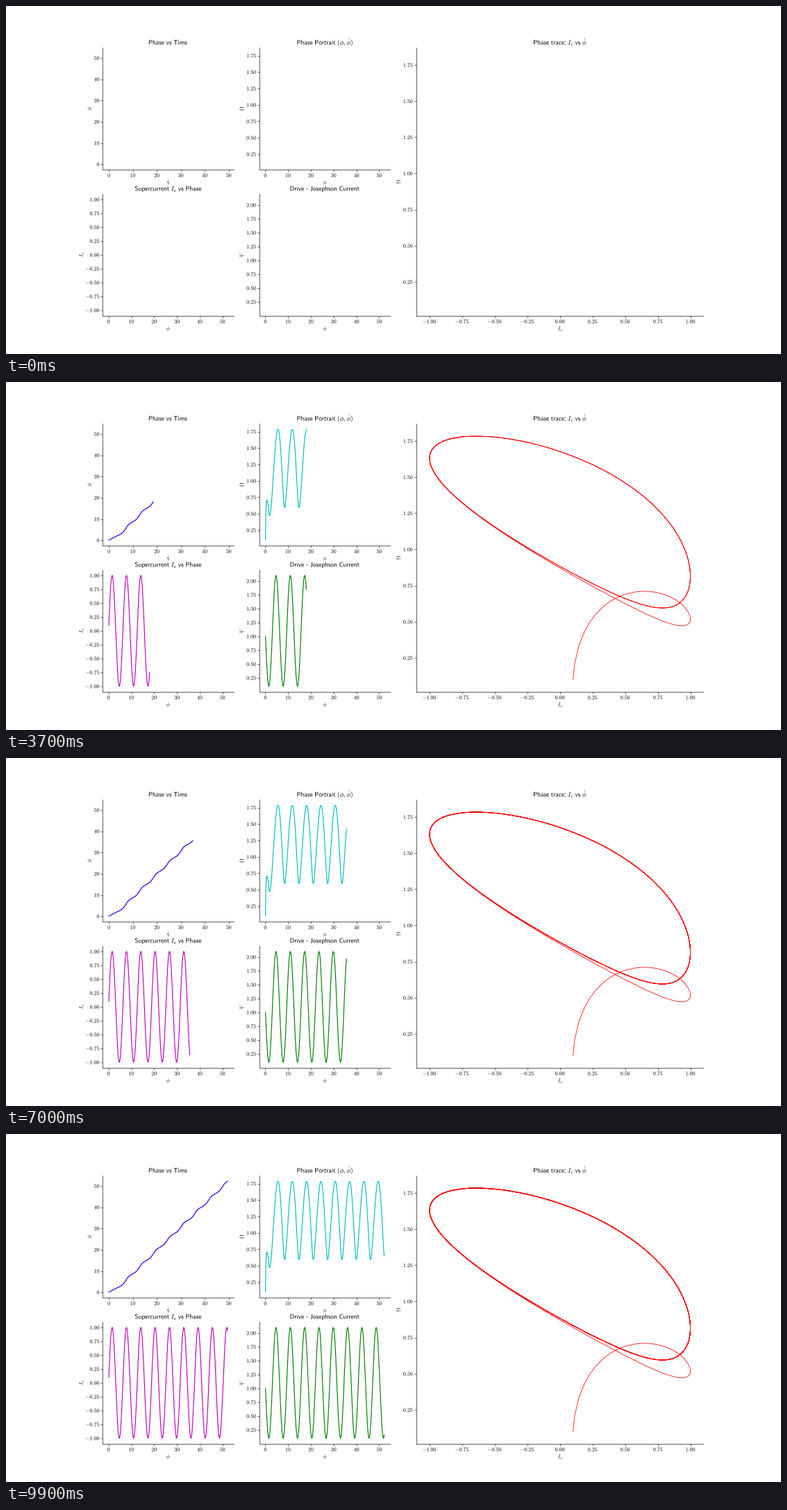
These frames come from a looping animation (1116 by 502 pixels, 10 s). A matplotlib script:

```python
import numpy as np
import matplotlib.pyplot as plt
from matplotlib.animation import FuncAnimation
from matplotlib.patches import PathPatch
from matplotlib.textpath import TextPath
from matplotlib.transforms import Affine2D

plt.rcParams.update({
    "font.family": "Liberation Sans",
    "mathtext.fontset": "cm",
})

DPI = 55.8
PT = DPI / 72               # one point in pixels
FRAMES, INTERVAL = 100, 100
STEPS_PER_FRAME = 5
DT = 0.1
DRIVE, DAMPING = 1.5, 1.2   # junction equation
SHOWN_DRIVE = 1.1           # offset in the drive panel

# Text layout in pixels
EM = 10 * PT
ASCENT, DESCENT = 0.694 * EM, 0.194 * EM
TICK_GAP = 7 * PT
LABEL_GAP = 4 * PT
TITLE_GAP = 6 * PT


def slope(s):
    phi, omega = s
    return np.array([omega, DRIVE - DAMPING * omega - np.sin(phi)])


def solve(n, dt, sub=4):
    """Integrate the damped, driven junction with RK4."""
    h = dt / sub
    s = np.array([0.1, 0.1])
    out = [s]
    for _ in range(n):
        for _ in range(sub):
            k1 = slope(s)
            k2 = slope(s + h / 2 * k1)
            k3 = slope(s + h / 2 * k2)
            k4 = slope(s + h * k3)
            s = s + h / 6 * (k1 + 2 * k2 + 2 * k3 + k4)
        out.append(s)
    return np.array(out).T


def sans(text):
    return r"$\mathsf{" + text.replace(" ", r"\ ") + "}$"


def write(text, x, y, points=10, align=0.5, angle=0):
    """Draw unhinted text with its baseline at pixel (x, y); return its width."""
    path = TextPath((0, 0), text, size=points * PT)
    box = path.get_extents()
    place = (Affine2D().translate(-box.x0 - align * box.width, 0)
             .rotate_deg(angle).translate(x, y))
    fig.add_artist(PathPatch(path, fc="black", lw=0, snap=False,
                             transform=place))
    return box.width


def number(v, step):
    digits = 0 if step >= 1 else 2
    return rf"$\mathrm{{{round(v, 2) + 0.0:.{digits}f}}}$"


def padded(values, margin=0.05):
    lo, hi = values.min(), values.max()
    pad = margin * (hi - lo)
    return lo - pad, hi + pad


def multiples(limits, step):
    lo, hi = limits
    return step * np.arange(np.ceil(lo / step), np.floor(hi / step) + 1)


def panel(cell, x, y, color, title, xlabel, ylabel, xstep, ystep, lw=1.5):
    ax = fig.add_subplot(cell)
    ax.spines[["top", "right"]].set_visible(False)
    ax.set(xlim=padded(x), ylim=padded(y))
    xticks = multiples(ax.get_xlim(), xstep)
    yticks = multiples(ax.get_ylim(), ystep)
    ax.set_xticks(xticks)
    ax.set_yticks(yticks)
    ax.tick_params(labelbottom=False, labelleft=False)

    box = ax.bbox
    xmid, ymid = (box.x0 + box.x1) / 2, (box.y0 + box.y1) / 2
    to_px = ax.transData.transform

    base = box.y0 - TICK_GAP - ASCENT
    for v in xticks:
        write(number(v, xstep), to_px((v, y[0]))[0], base)
    write(xlabel, xmid, base - DESCENT - LABEL_GAP - ASCENT)

    right = box.x0 - TICK_GAP
    width = max(write(number(v, ystep), right,
                      to_px((x[0], v))[1] - ASCENT / 2, align=1)
                for v in yticks)
    write(ylabel, right - width - LABEL_GAP - DESCENT, ymid, angle=90)

    write(title, xmid, box.y1 + TITLE_GAP, points=12)
    line, = ax.plot([], [], color=color, lw=lw)
    return line, x, y


steps = STEPS_PER_FRAME * (FRAMES - 1)
t = np.arange(steps + 1) * DT
phi, omega = solve(steps, DT)
current = np.sin(phi)
voltage = SHOWN_DRIVE - current

fig = plt.figure(figsize=((1116 + 1e-6) / DPI, (502 + 1e-6) / DPI), dpi=DPI,
                 facecolor="white")
# left sits just under 1/8 so the spine snaps to the lower pixel
grid = fig.add_gridspec(2, 4, left=0.12499, right=0.9, bottom=0.11, top=0.88,
                        wspace=0.2, hspace=0.2)

PHI, OMEGA, I_S = r"$\phi$", r"$\Omega$", r"$I_s$"

panels = [
    panel(grid[0, 0], t, phi, "b", sans("Phase vs Time"),
          sans("t"), PHI, 10, 10),
    panel(grid[0, 1], phi, omega, "c",
          sans("Phase Portrait") + r" $(\phi, \dot{\phi})$",
          PHI, OMEGA, 10, 0.25),
    panel(grid[1, 0], phi, current, "m",
          f"{sans('Supercurrent')} {I_S} {sans('vs Phase')}",
          PHI, I_S, 10, 0.25),
    panel(grid[1, 1], phi, voltage, "g",
          f"{sans('Drive')} - {sans('Josephson Current')}",
          PHI, r"$V$", 10, 0.25),
    panel(grid[:, 2:], current, omega, "r",
          f"{sans('Phase trace')}: {I_S} {sans('vs')} " + r"$\dot{\phi}$",
          I_S, OMEGA, 0.25, 0.25, lw=1.0),
]
lines = [p[0] for p in panels]


def draw(i):
    n = STEPS_PER_FRAME * i + 1 if i else 0
    for line, x, y in panels:
        line.set_data(x[:n], y[:n])
    return lines


def reset():
    return draw(0)


anim = FuncAnimation(fig, draw, frames=FRAMES, init_func=reset,
                     interval=INTERVAL, repeat=True, repeat_delay=0)
plt.show()
```
